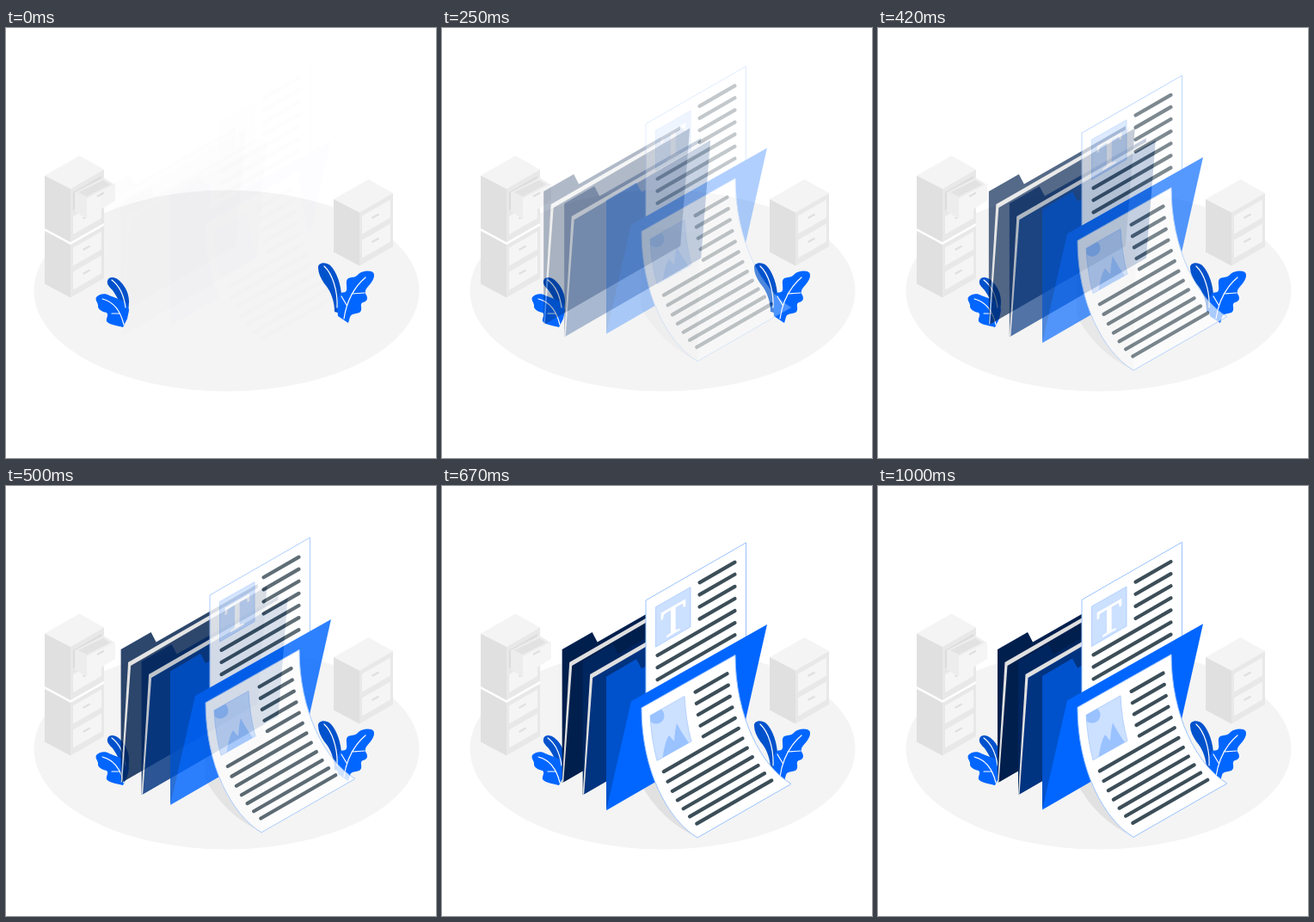
These frames come from a looping animation (500 by 500 pixels, 1.04 s). An HTML page:

```html
<!DOCTYPE html>
<html lang="en">
<head>
<meta charset="utf-8">
<title>Folders and documents</title>
<style>
  html, body { margin: 0; width: 100%; height: 100%; overflow: hidden; background: #fff; }
  svg { display: block; width: 100%; height: 100%; }
  .panel { fill: var(--panel); }
  .front { fill: var(--front); }
  .vein { fill: none; stroke: #fff; stroke-width: 1.2; stroke-linecap: round; }
  .text { fill: none; stroke: #3c4e58; stroke-width: 4.2; stroke-linecap: round; }
  .sheet { fill: #fff; stroke: #99c2ff; stroke-linejoin: round; }
  .picture { fill: #cce0ff; stroke: #a9cbff; stroke-width: .8; }
</style>
</head>
<body>
<svg viewBox="0 0 500 500">
  <defs>
    <!-- Origin: the top corner nearest the viewer -->
    <g id="cabinet">
      <path fill="#f4f4f4" d="M0 0L-30-15.5 10.500-38.500 39-22.500Z"/>
      <path fill="#e0e0e0" d="M0 0L-30-15.500V46L0 62Z"/>
      <path fill="#e8e8e8" d="M0 0L39-22.500V39.500L0 62Z"/>
    </g>
    <g id="drawer">
      <path fill="#f5f5f5" d="M3 4L36-15V6L3 25Z"/>
      <path stroke="#e0e0e0" stroke-width="2.500" d="M14.500 6.500L22.500 2"/>
    </g>
    <g id="folder">
      <path class="panel" d="M139 190L174 170 180 181.500 298 114V253L139 345Z"/>
      <path fill="#e0e0e0" d="M147.500 205L303 115.500 298 253 139 345Z"/>
      <path class="front" d="M150.500 209L309 116.500 298 253.500 140.500 344.500Z"/>
    </g>
    <clipPath id="frame"><path d="M242 267L282 244.500Q283.500 273 290 297L250 319.500Q243.500 295 242 267Z"/></clipPath>
  </defs>

  <ellipse cx="256.500" cy="305.500" rx="224" ry="117" fill="#f4f4f4"/>

  <g id="cabinets">
    <g transform="translate(75 251.500)">
      <use href="#cabinet"/><use href="#drawer"/><use href="#drawer" y="28"/>
    </g>
    <path fill="none" stroke="#fff" stroke-width="2.500" d="M45 234L75 250.500 114 228.500"/>
    <g transform="translate(75 187)">
      <use href="#cabinet"/><use href="#drawer" y="28"/>
      <path fill="#dcdcdc" d="M3 4L36-15V6L3 25Z"/>
      <path fill="#ededed" d="M5 4L38-13 51-5 19 12V35L5 26Z"/>
      <path fill="#e2e2e2" d="M9 4L38-10 46-5 19 9Z"/>
      <path fill="#f5f5f5" d="M19 11L52-6V14L19 34Z"/>
      <path stroke="#e0e0e0" stroke-width="2.500" d="M31 9L39 4.500"/>
    </g>
    <g transform="translate(411 214.500)">
      <use href="#cabinet"/><use href="#drawer"/><use href="#drawer" y="28"/>
    </g>
  </g>

  <g id="plants">
    <path fill="#0052cc" d="M118 294C119 289 126 289 131 293C138 299 143 308 143 318L142 333 137 340C137 326 130 314 124 305C120 301 117 298 118 294Z"/>
    <path fill="#06f" d="M105 313C108 309 116 308 120 311C127 314 135 316 140 320L143 328 141 338 136 348C130 346 119 345 117 341C116 337 120 334 117 331C112 330 107 327 107 324C108 320 103 317 105 313Z"/>
    <path class="vein" d="M123 293C131 299 137 310 139 325M112 315C124 318 133 328 137 345M123 332H132"/>
    <path fill="#0052cc" d="M363 279C362 273 371 271 377 276C385 284 390 300 390 312L386 331 382 330C382 318 378 306 370 297C366 291 363 285 363 279Z"/>
    <path fill="#06f" d="M427.500 285C425 281 414 282 410 286C406 291 403 289 398 291C394 294 397 300 396 305C394 309 391 306 388 309C385 315 385 325 386 335L398 343 400 336C402 330 412 334 413 328C414 324 411 321 415 319C421 318 421 313 418 309C417 304 420 302 424 297C427 293 429 289 427.500 285Z"/>
    <path class="vein" d="M370 277C379 285 386 305 385 325M418 290C404 302 396 318 393 338M402 309L417 308M396 322L390 312"/>
  </g>

  <g class="right" style="--panel:#001f4d;--front:#001f4d"><use href="#folder"/></g>
  <g class="right" style="--panel:#002660;--front:#003380"><use href="#folder" x="24" y="14"/></g>
  <path class="down" fill-opacity=".08" d="M231 250V345Q253 387 297 408.300L300 260Z"/>

  <g class="down">
    <path fill="#0052cc" d="M191 221L226 200.500 232 211.500 240 207.500V250L191 376Z"/>
    <path class="sheet" d="M237 132.300L353.500 65.300V200L237 250Z"/>
    <path class="picture" d="M248.500 140L289 117V163L248.500 186.500Z"/>
    <text transform="matrix(1 -.577 0 1 269 171)" text-anchor="middle" font-family="'Liberation Serif', serif" font-size="48" fill="#fff" stroke="#fff">T</text>
    <path id="backText" class="text"/>
    <path fill="#06f" d="M191 376.500L220 249.500 378 160.300 350 284.500Z"/>
    <g transform="translate(0 -.7)">
      <path class="sheet" d="M232 258C232 330 262 388 297 409L406 346.500C371 325.500 341 268 341 196.500Z"/>
      <path class="picture" d="M242 267L282 244.500Q283.500 273 290 297L250 319.500Q243.500 295 242 267Z"/>
      <g clip-path="url(#frame)" fill="#99c2ff">
        <circle cx="249" cy="267" r="9.500"/>
        <path d="M256 320Q259 297 264 290L270 297Q271 283 273 276Q279 288 290 303V325Z"/>
      </g>
      <path id="frontText" class="text"/>
    </g>
  </g>
</svg>

<script>
  const SLOPE = -0.577, FPS = 24, LOOP = 1040, STEP = 41.6, SHIFT = 30;
  const $ = id => document.getElementById(id);
  const line = (x, y, w) => `M${x} ${y}l${w} ${w * SLOPE}`;

  // Straight sheet: four short lines beside the picture, then full-width ones
  let d = '';
  for (let i = 0; i < 7; i++) {
    const x = i < 4 ? 299.5 : 250.5;
    d += line(x, 88 + 14.1 * i + (x - 340.5) * SLOPE, 340.5 - x);
  }
  $('backText').setAttribute('d', d);

  // Curled sheet: lines start along its left edge
  const edge = document.createElementNS('http://www.w3.org/2000/svg', 'path');
  edge.setAttribute('d', 'M232 258C232 330 262 388 297 409');
  d = '';
  for (let i = 0; i < 12; i++) {
    const p = edge.getPointAtLength(17.4 + 13.5 * i - 0.09 * i * i);
    const inset = i < 5 ? 62 : 12;
    d += line(p.x + inset, p.y + inset * SLOPE, 99 - inset);
  }
  $('frontText').setAttribute('d', d);

  const bezier = (a, b, s) => 3 * a * s * (1 - s) ** 2 + 3 * b * s * s * (1 - s) + s ** 3;

  // cubic-bezier(.36, -.01, .5, 1.38)
  function ease(x) {
    let lo = 0, hi = 1;
    for (let i = 0; i < 24; i++) {
      const mid = (lo + hi) / 2;
      if (bezier(0.36, 0.5, mid) < x) lo = mid; else hi = mid;
    }
    return bezier(-0.01, 1.38, hi);
  }

  const down = document.querySelectorAll('.down');
  const right = document.querySelectorAll('.right');

  function place(parts, x, y, opacity) {
    for (const part of parts) {
      part.setAttribute('transform', `translate(${x} ${y})`);
      part.setAttribute('opacity', opacity);
    }
  }

  function draw() {
    const frame = Math.min(24, Math.floor((performance.now() % LOOP + 5) / STEP));
    const p = ease(Math.min(1, (frame + 1) / FPS));
    const offset = SHIFT * (p - 1);
    const opacity = Math.max(0, Math.min(1, p));
    place(down, 0, offset, opacity);
    place(right, offset, 0, opacity);
    requestAnimationFrame(draw);
  }
  draw();
</script>
</body>
</html>
```
